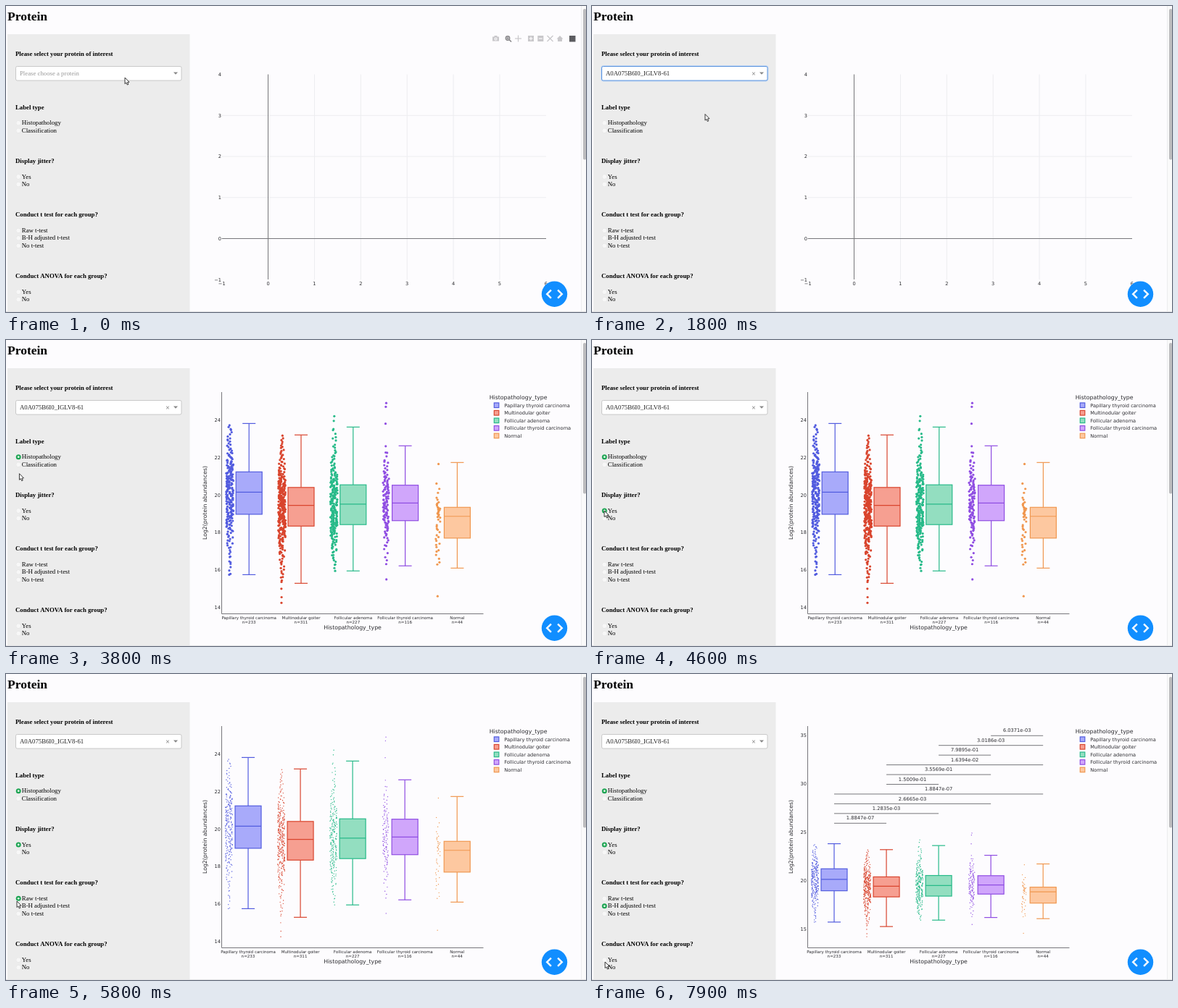
Write an HTML page with a canvas that moves like this. It is 800 px wide and 423 px high and loops after 8000 ms.

```html
<!DOCTYPE html>
<html lang="en">
<head>
<meta charset="utf-8">
<title>Protein dashboard</title>
<style>
  html, body { margin: 0; width: 100%; height: 100%; overflow: hidden; background: #fdfcfe; }
  canvas { display: block; }
</style>
</head>
<body>
<canvas id="stage" width="800" height="423"></canvas>
<script>
const ctx = document.getElementById('stage').getContext('2d');
const LOOP = 8000;
const SERIF = '"Liberation Serif", serif';
const SANS = '"DejaVu Sans", sans-serif';
const PROTEIN = 'A0A075B6I0_IGLV8-61';
const MENU = ['A0A075B6H7_IGKV3-7', 'A0A075B6H9_IGLV4-69', PROTEIN,
  'A0A075B6I1_IGLV4-60', 'A0A075B6I9_IGLV7-46', 'A0A075B6J9_IGLV2-18'];

// Moments (ms) at which the page changes
const AT = { open: 500, pick: 1500, blur: 3200, chart: 3700, small: 5000, raw: 6200, adjusted: 7400 };

// Cursor stops: time, x, y
const PATH = [
  [0, 164, 99], [800, 164, 99], [1400, 156, 149.5], [1900, 156, 149.5], [2900, 20, 162],
  [3100, 19, 164], [3500, 19, 164], [4350, 17, 236], [4800, 17, 236], [5550, 15, 314],
  [5900, 15, 314], [6350, 16, 322], [7000, 16, 322], [7800, 18, 398], [8000, 18, 398]
];

// Each option: label, time selected, time cleared
const SECTIONS = [
  { title: 'Label type', y: 140, options: [['Histopathology', 3200], ['Classification']] },
  { title: 'Display jitter?', y: 214.3, options: [['Yes', 4500], ['No']] },
  { title: 'Conduct t test for each group?', y: 288.6,
    options: [['Raw t-test', 5700, 6900], ['B-H adjusted t-test', 6900], ['No t-test']] },
  { title: 'Conduct ANOVA for each group?', y: 373.5, options: [['Yes'], ['No']] }
];

const GROUPS = [
  { name: 'Papillary thyroid carcinoma', n: 233, ink: '#525cdf', fill: '#a8aafa',
    box: [15.75, 18.97, 20.15, 21.23, 23.81], extra: [15.75] },
  { name: 'Multinodular goiter', n: 311, ink: '#d9452e', fill: '#f69f91',
    box: [15.29, 18.34, 19.44, 20.4, 23.2], extra: [14.25, 14.55, 15] },
  { name: 'Follicular adenoma', n: 227, ink: '#27ba89', fill: '#93dec0',
    box: [15.95, 18.42, 19.51, 20.54, 23.62], extra: [23.95, 24.2] },
  { name: 'Follicular thyroid carcinoma', n: 116, ink: '#8f4de2', fill: '#d0a6fb',
    box: [16.22, 18.63, 19.57, 20.52, 22.62], extra: [24.9, 24.7, 23.8, 15.5] },
  { name: 'Normal', n: 44, ink: '#f0974f', fill: '#fdc8a0',
    box: [16.1, 17.7, 18.86, 19.34, 21.73], extra: [14.6] }
];
const RAW = ['3.7694e-08', '3.8505e-04', '1.0666e-03', '3.4200e-08', '1.2007e-01',
  '3.2013e-01', '1.1475e-02', '7.9895e-01', '1.5093e-03', '3.6222e-03'];
const ADJUSTED = ['1.8847e-07', '1.2835e-03', '2.6665e-03', '1.8847e-07', '1.5009e-01',
  '3.5569e-01', '1.6394e-02', '7.9895e-01', '3.0186e-03', '6.0371e-03'];

function random(seed) {
  return () => {
    seed = (seed * 1664525 + 1013904223) % 4294967296;
    return seed / 4294967296;
  };
}

// Spread n points so that they follow the five-number summary of the box
GROUPS.forEach((group, index) => {
  const rnd = random(71 + index * 977);
  const [lo, q1, median, q3, hi] = group.box;
  const count = group.n - group.extra.length;
  const spread = 3 + 2 * Math.min(1, group.n / 200);
  group.points = [];
  for (let i = 0; i < count; i++) {
    const u = 2 * (i + rnd()) / count - 1;
    const d = Math.abs(u);
    const half = u < 0 ? median - q1 : q3 - median;
    const reach = u < 0 ? median - lo : hi - median;
    const offset = 2 * half * d + (reach - 2 * half) * d ** 8;
    group.points.push([(rnd() * 2 - 1) * spread * (1 - 0.65 * d ** 8), median + Math.sign(u) * offset]);
  }
  group.extra.forEach(v => group.points.push([rnd() * 2 - 1, v]));
});

function text(str, x, y, size, { font = SERIF, bold = false, color = '#000', align = 'left' } = {}) {
  ctx.font = `${bold ? 'bold ' : ''}${size}px ${font}`;
  ctx.fillStyle = color;
  ctx.textAlign = align;
  ctx.fillText(str, x, y);
}

function label(str, x, y, size, align = 'center', color = '#2b2b2f') {
  text(str, x, y + size * 0.36, size, { font: SANS, align, color });
}

function line(color, width, ...pts) {
  ctx.strokeStyle = color;
  ctx.lineWidth = width;
  ctx.beginPath();
  pts.forEach(([x, y], i) => i ? ctx.lineTo(x, y) : ctx.moveTo(x, y));
  ctx.stroke();
}

function rect(x, y, w, h, fill) {
  ctx.fillStyle = fill;
  ctx.fillRect(x, y, w, h);
}

function disc(x, y, r, fill) {
  ctx.fillStyle = fill;
  ctx.beginPath();
  ctx.arc(x, y, r, 0, Math.PI * 2);
  ctx.fill();
}

function roundBox(x, y, w, h, r, fill, stroke) {
  ctx.beginPath();
  ctx.roundRect(x, y, w, h, r);
  ctx.fillStyle = fill;
  ctx.fill();
  ctx.strokeStyle = stroke;
  ctx.lineWidth = 1;
  ctx.stroke();
}

function radio(x, y, on) {
  if (on) {
    disc(x, y, 3.5, '#1fa554');
    disc(x, y, 1.4, '#e4f5ea');
  } else {
    disc(x, y, 3.3, '#e2e2e2');
    disc(x, y, 2.9, '#f7f7f7');
  }
}

function drawSidebar(t) {
  rect(2, 39, 251.5, 384, '#ececec');
  text('Protein', 2, 20, 17.5, { bold: true });
  text('Please select your protein of interest', 13, 69, 8.75, { bold: true });
  for (const { title, y, options } of SECTIONS) {
    text(title, 13, y + 2.7, 8.75, { bold: true });
    options.forEach(([name, on = Infinity, off = Infinity], i) => {
      const cy = y + 21.7 + i * 10.5;
      radio(17.2, cy, t >= on && t < off);
      text(name, 21.8, cy + 2.6, 8.75);
    });
  }
}

function drawDropdown(t, cursorY) {
  const open = t >= AT.open && t < AT.pick;
  const picked = t >= AT.pick;
  const focused = t >= AT.open && t < AT.blur;
  if (focused) roundBox(12.5, 82.5, 230.5, 21.5, 3, '#c4d9f5', '#c4d9f5');
  roundBox(13.5, 83.5, 228.5, 19.5, 2, '#fff', focused ? '#5b93dc' : '#c8c8c8');
  text(picked ? PROTEIN : 'Please choose a protein', 19, 96, 8.75, { color: picked ? '#222' : '#999' });
  if (picked) text('×', 223, 96.8, 10.5, { align: 'center', color: '#666' });
  const dir = open ? -1 : 1;
  ctx.fillStyle = '#888';
  ctx.beginPath();
  ctx.moveTo(231, 93 - 1.5 * dir);
  ctx.lineTo(237, 93 - 1.5 * dir);
  ctx.lineTo(234, 93 + 1.7 * dir);
  ctx.fill();
  if (!open) return;
  roundBox(13.5, 103.5, 228.5, 110, 1, '#fff', '#c8c8c8');
  ctx.save();
  ctx.beginPath();
  ctx.rect(14, 104, 227.5, 109);
  ctx.clip();
  MENU.forEach((name, i) => {
    const y = 104 + i * 19.3;
    if (cursorY >= y && cursorY < y + 19.3) rect(14, y, 227.5, 19.3, '#ebf5ff');
    text(name, 19, y + 12.5, 8.75, { color: '#555' });
  });
  ctx.restore();
}

function drawModebar(alpha) {
  const pale = '#c9c8cb';
  ctx.save();
  ctx.globalAlpha = alpha;
  rect(671, 42.5, 9, 6, pale);
  rect(673.5, 41, 4, 2, pale);
  disc(675.5, 45.5, 2, '#fdfcfe');
  disc(675.5, 45.5, 1, pale);
  disc(692, 44.5, 3.4, '#858487');
  disc(692, 44.5, 2.1, '#e4e3e6');
  line('#858487', 1, [690.3, 44.5], [693.7, 44.5]);
  line('#858487', 1, [692, 42.8], [692, 46.2]);
  line('#858487', 1.6, [694.3, 46.8], [697, 49.5]);
  line(pale, 1.2, [702, 45], [711, 45]);
  line(pale, 1.2, [706.5, 40.5], [706.5, 49.5]);
  for (const x of [724, 737.3]) {
    rect(x - 4, 41, 8, 8, pale);
    line('#fdfcfe', 1.2, [x - 2.4, 45], [x + 2.4, 45]);
  }
  line('#fdfcfe', 1.2, [724, 42.6], [724, 47.4]);
  line(pale, 1.3, [746.5, 41], [754.5, 49]);
  line(pale, 1.3, [754.5, 41], [746.5, 49]);
  ctx.fillStyle = pale;
  ctx.beginPath();
  [[759.5, 45.5], [764, 41], [768.5, 45.5], [767, 45.5], [767, 49], [761, 49], [761, 45.5]]
    .forEach(([x, y]) => ctx.lineTo(x, y));
  ctx.fill();
  rect(777, 41, 8.5, 8.5, '#5c5c60');
  ctx.restore();
}

function drawEmptyPlot() {
  const px = v => 361.6 + v * 63.87;
  const py = v => 321.5 - v * 56.75;
  for (let v = 1; v <= 5; v++) line('#ededf0', 1, [px(v), 94.5], [px(v), 378]);
  for (let v = 1; v <= 3; v++) line('#ededf0', 1, [297.7, py(v)], [745, py(v)]);
  line('#77777b', 1, [361.5, 94.5], [361.5, 378]);
  line('#77777b', 1, [297.7, 321.5], [745, 321.5]);
  const name = v => String(v).replace('-', '−');
  for (let v = -1; v <= 6; v++) label(name(v), px(v), 383.6, 6.6);
  for (let v = -1; v <= 4; v++) label(name(v), 297, py(v), 6.6, 'right');
}

function boxShape(x, y, w, h, { fill, ink }) {
  rect(x, y, w, h, fill);
  ctx.strokeStyle = ink;
  ctx.lineWidth = 1.2;
  ctx.strokeRect(x, y, w, h);
}

function drawLegend() {
  label('Histopathology_type', 666.7, 79, 7.75, 'left');
  GROUPS.forEach((group, i) => {
    const y = 90.2 + i * 10.55;
    boxShape(673.3, y - 3.3, 6.5, 6.6, group);
    label(group.name, 687.2, y, 6.65, 'left');
  });
}

function drawTests(cx, values) {
  let k = 0;
  for (let a = 0; a < 4; a++) {
    for (let b = a + 1; b < 5; b++, k++) {
      const y = 206.3 - k * 13.45;
      line('#77777b', 1, [cx(a), y], [cx(b), y]);
      label(values[k], (cx(a) + cx(b)) / 2, y - 7.3, 6.7);
    }
  }
}

function drawBoxPlot(t) {
  const tests = t >= AT.raw;
  const small = t >= AT.small;
  const cx = small ? i => 334 + 72.05 * i : i => 335.2 + 71.8 * i;
  const py = tests ? v => 285.8 - (v - 20) * 13.44 : v => 214.2 - (v - 20) * 25.93;
  const ticks = tests ? [15, 20, 25, 30, 35] : [14, 16, 18, 20, 22, 24];

  line('#77777b', 1, [297.5, 72], [297.5, 378.5], [658.5, 378.5]);
  ticks.forEach(v => label(v, 296, py(v), 6.6, 'right'));

  GROUPS.forEach((group, i) => {
    const x = cx(i);
    const [lo, q1, median, q3, hi] = group.box.map(py);
    for (const [dx, v] of group.points) disc(x - 26.4 + dx, py(v), small ? 0.68 : 1.6, group.ink);
    line(group.ink, 1.2, [x, lo], [x, q1]);
    line(group.ink, 1.2, [x, q3], [x, hi]);
    line(group.ink, 1.2, [x - 9, lo], [x + 9, lo]);
    line(group.ink, 1.2, [x - 9, hi], [x + 9, hi]);
    boxShape(x - 18, q3, 36, q1 - q3, group);
    line(group.ink, 1.2, [x - 18, median], [x + 18, median]);
    label(group.name, x, 383.7, 5.55);
    label('n=' + group.n, x, 389.6, 5.55);
  });

  label('Histopathology_type', 478, 397.5, 7.75);
  ctx.save();
  ctx.translate(274.3, 225);
  ctx.rotate(-Math.PI / 2);
  label('Log2(protein abundances)', 0, 0, 7.75);
  ctx.restore();
  drawLegend();
  if (tests) drawTests(cx, t < AT.adjusted ? RAW : ADJUSTED);
}

function drawChrome() {
  disc(756.5, 398.2, 17.7, '#118eff');
  for (const side of [-1, 1]) {
    const x = 756.5 + side * 4.6;
    line('#fff', 2.4, [x, 392.6], [x + side * 5.7, 398.2], [x, 403.8]);
  }
  rect(793.5, 0, 6.5, 423, '#fafafa');
  rect(793, 0, 1, 423, '#ececee');
  ctx.fillStyle = '#bdbdbf';
  ctx.beginPath();
  ctx.roundRect(796, 4, 4.2, 208.5, 2);
  ctx.fill();
  rect(0, 422, 800, 1, '#e4e4e6');
}

function cursorAt(t) {
  const i = Math.max(1, PATH.findIndex(stop => stop[0] > t));
  const [t0, x0, y0] = PATH[i - 1];
  const [t1, x1, y1] = PATH[i];
  const p = (t - t0) / (t1 - t0);
  const e = p * p * (3 - 2 * p);
  return [x0 + (x1 - x0) * e, y0 + (y1 - y0) * e];
}

function drawCursor(x, y) {
  ctx.beginPath();
  [[0, 0], [0, 8.6], [1.9, 6.9], [3.3, 10], [4.8, 9.3], [3.5, 6.4], [6, 6.2]]
    .forEach(([dx, dy]) => ctx.lineTo(x + dx, y + dy));
  ctx.closePath();
  ctx.fillStyle = '#fff';
  ctx.fill();
  ctx.strokeStyle = '#222';
  ctx.lineWidth = 0.9;
  ctx.stroke();
}

function render(t) {
  const [x, y] = cursorAt(t);
  rect(0, 0, 800, 423, '#fdfcfe');
  if (t < AT.chart) drawEmptyPlot();
  else drawBoxPlot(t);
  const barAlpha = Math.min(1, Math.max(0, (400 - t) / 300));
  if (barAlpha > 0) drawModebar(barAlpha);
  drawSidebar(t);
  drawDropdown(t, y);
  drawChrome();
  drawCursor(x, y);
}

const start = performance.now();
function tick() {
  render((performance.now() - start) % LOOP);
  requestAnimationFrame(tick);
}
tick();
</script>
</body>
</html>
```
